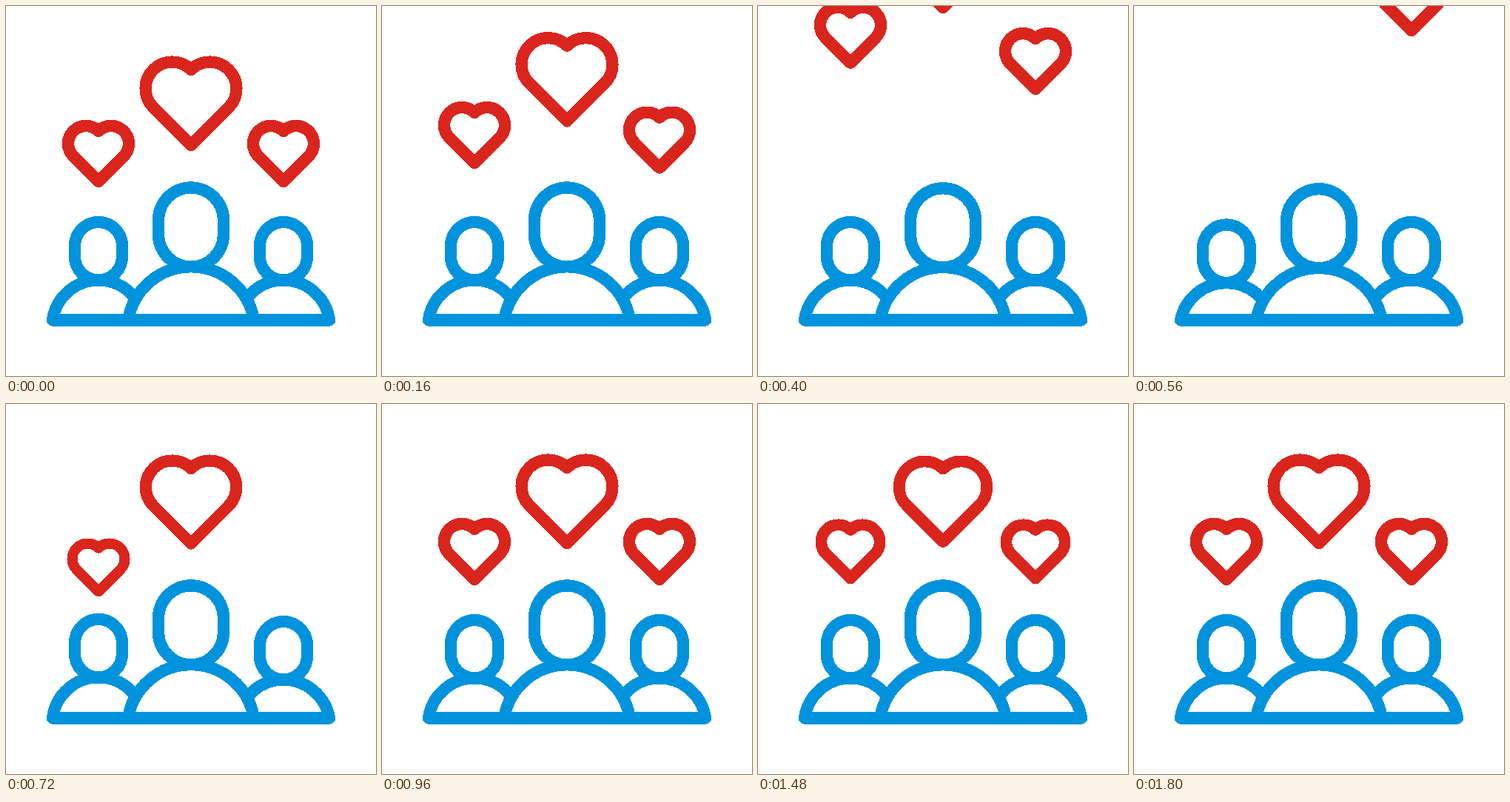
An HTML page that plays this animation: 500 by 500 pixels, repeating every 2 s.

```html
<!DOCTYPE html>
<html lang="en">
<head>
<meta charset="utf-8">
<title>People and hearts</title>
<style>
  html, body { margin: 0; width: 100%; height: 100%; overflow: hidden; background: #fff; }
  svg { display: block; width: 100vw; height: 100vh; shape-rendering: crispEdges; }
  path, rect { stroke-width: 16.3; stroke-linecap: round; stroke-linejoin: round; fill: #fff; }
  .hearts { stroke: #da251d; }
  .people { stroke: #0093dd; }
</style>
</head>
<body>
<svg viewBox="0 0 500 500">
  <g class="hearts"></g>
  <g class="people"></g>
</svg>
<script>
const LOOP = 2000, STEP = 40, BASE = 424.5;

// exit: [end time, distance]; pop: [start, end]; origin: where the new heart grows from
const figures = [
  { x: 125, half: 41, lobe: 24, top: 162, exit: [680, 270], pop: [600, 840], origin: 360,
    head: { y: 292, r: 32, h: 78.5 }, body: { w: 62, y: 370.5 } },
  { x: 375, half: 41, lobe: 24, top: 162, exit: [770, 255], pop: [720, 960], origin: 360,
    head: { y: 292, r: 32, h: 78.5 }, body: { w: 62, y: 370.5 } },
  { x: 250, half: 62, lobe: 36, top: 75, exit: [560, 240], pop: [540, 750], origin: 352,
    head: { y: 245.5, r: 44, h: 107 }, body: { w: 85, y: 352.3 } }
];

const EXIT_START = 40;
const pulse = [[1280, 1], [1440, 0.958], [1640, 1.037], [1800, 1]];
// vertical sway of a person, timed from the moment the heart pops out
const sway = [[-160, 0], [-80, 5], [0, 2], [110, -1.2], [200, 0]];

const clamp = v => Math.min(1, Math.max(0, v));
const smooth = v => { const a = clamp(v); return a * a * (3 - 2 * a); };

function track(keys, t) {
  let value = keys[0][1];
  for (let i = 1; i < keys.length; i++) {
    const [t0, v0] = keys[i - 1], [t1, v1] = keys[i];
    if (t >= t0) value = v0 + (v1 - v0) * smooth((t - t0) / (t1 - t0));
  }
  return value;
}

function add(parent, tag, attrs = {}) {
  const node = document.createElementNS('http://www.w3.org/2000/svg', tag);
  for (const name in attrs) node.setAttribute(name, attrs[name]);
  return parent.appendChild(node);
}

// Two circular lobes joined to the tip by 45-degree lines, centred on 0,0
function heartPath({ half, lobe: r, height }) {
  const d = r * Math.SQRT1_2, cx = half - r, cy = r - height / 2;
  const notch = cy - Math.sqrt(r * r - cx * cx);
  return `M0 ${notch} A${r} ${r} 0 0 1 ${cx + d} ${cy + d} L0 ${height / 2}
    L${-cx - d} ${cy + d} A${r} ${r} 0 0 1 0 ${notch}Z`;
}

function bodyPath(x, w, y) {
  const h = BASE - y, r = (w * w + h * h) / (2 * h);
  return `M${x - w} ${BASE} A${r} ${r} 0 0 1 ${x + w} ${BASE}Z`;
}

const hearts = document.querySelector('.hearts');
const people = document.querySelector('.people');

for (const f of figures) {
  f.height = f.half + f.lobe * Math.SQRT2;
  f.cy = f.top + f.height / 2;
  f.heartNode = add(hearts, 'path', { d: heartPath(f) });
  const { y, r, h } = f.head;
  f.headNode = add(people, 'rect', { x: f.x - r, y, width: 2 * r, height: h, rx: r, ry: r });
  f.bodyNode = add(people, 'path');
}
add(people, 'path', { d: `M63 ${BASE}H437` });

function draw(t) {
  for (const f of figures) {
    const [exitEnd, distance] = f.exit, [popStart, popEnd] = f.pop;
    let y = f.cy, scale = track(pulse, t);
    if (t < popStart) {
      y -= distance * smooth((t - EXIT_START) / (exitEnd - EXIT_START));
    } else {
      const p = 1 - Math.pow(1 - clamp((t - popStart) / (popEnd - popStart)), 2.9);
      y = f.origin + (f.cy - f.origin) * p;
      scale *= p;
    }
    f.heartNode.setAttribute('transform', `translate(${f.x} ${y}) scale(${scale})`);
    f.heartNode.style.display = scale > 0 ? '' : 'none';

    const dy = track(sway, t - popStart);
    f.headNode.setAttribute('transform', `translate(0 ${dy})`);
    f.bodyNode.setAttribute('d', bodyPath(f.x, f.body.w, f.body.y + dy));
  }
}

const start = performance.now();
function tick() {
  const t = (performance.now() - start) % LOOP;
  draw(Math.floor(t / STEP) * STEP);
  requestAnimationFrame(tick);
}
tick();
</script>
</body>
</html>
```
